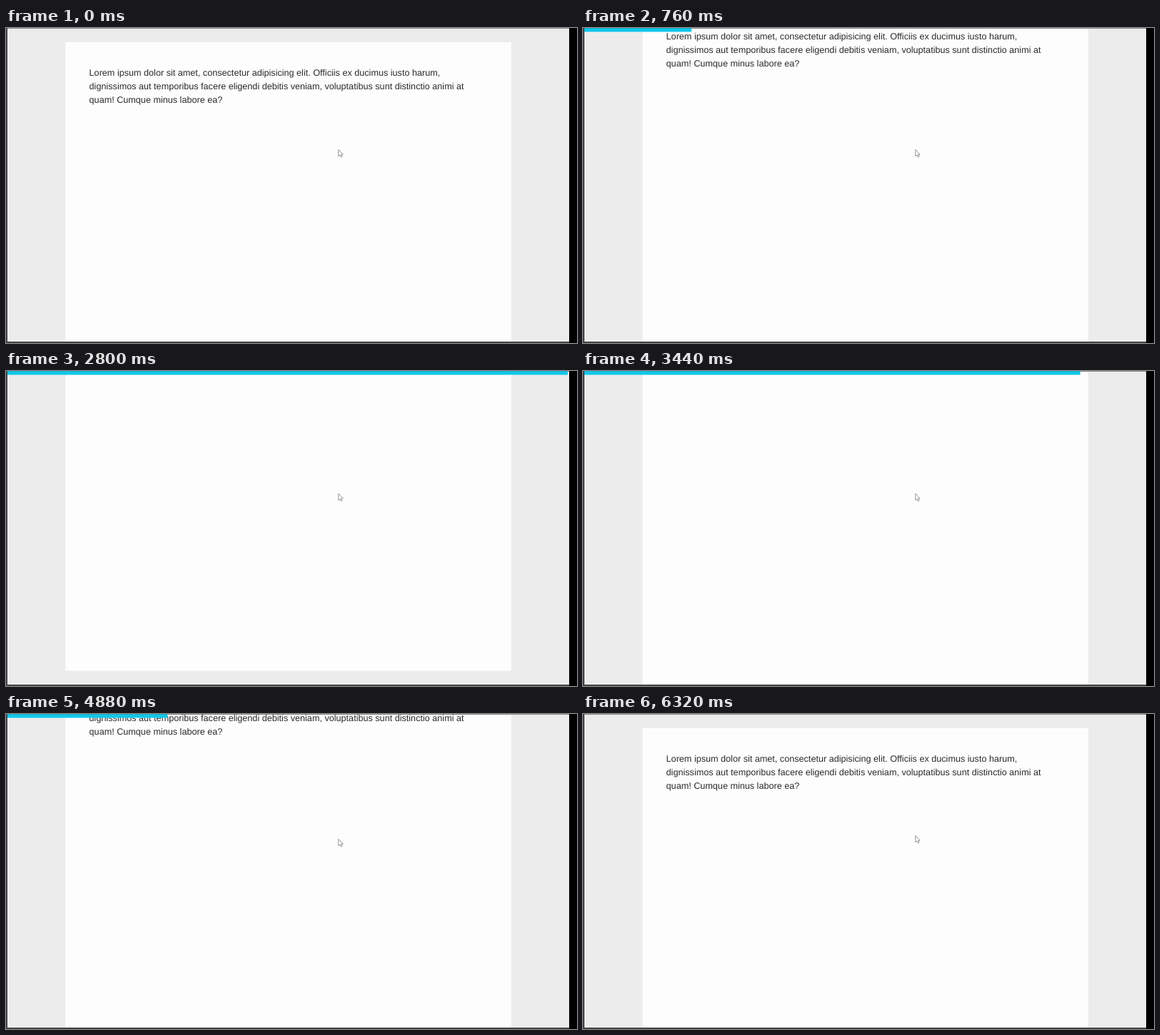
Write an HTML page that moves like this. It is 800 by 442 pixels and loops after 6760 ms.

```html
<!DOCTYPE html>
<html lang="en">
<head>
<meta charset="utf-8">
<title>Scroll progress bar</title>
<style>
  html, body { margin: 0; width: 100%; height: 100%; overflow: hidden; background: #000; }
  svg { display: block; width: 100%; height: 100%; }
  text { font: 12.63px "Liberation Sans", Arial, sans-serif; fill: #2b2b2b; text-rendering: geometricPrecision; }
</style>
</head>
<body>
<svg viewBox="0 0 800 442">
  <rect width="789" height="442" fill="#444"/>
  <svg x="2" width="787" height="440" viewBox="2 0 787 440">
    <rect x="2" width="787" height="440" fill="#ececec"/>
    <g id="page">
      <rect x="83.3" y="20" width="624.7" height="668" fill="#fdfdfd"/>
      <text x="116.6" y="67">Lorem ipsum dolor sit amet, consectetur adipisicing elit. Officiis ex ducimus iusto harum,</text>
      <text x="116.6" y="86">dignissimos aut temporibus facere eligendi debitis veniam, voluptatibus sunt distinctio animi at</text>
      <text x="116.6" y="105">quam! Cumque minus labore ea?</text>
    </g>
    <rect x="2" width="787" height="1" fill="#999"/>
    <rect id="bar" x="2" width="0" height="5.4" fill="#12c8ea"/>
    <rect x="2" width="787" height="1" fill="#444" opacity=".2"/>
  </svg>
  <path id="cursor" d="M465.8 170.6v9.4l2.1-1.9 1.6 3.1 1.5-.8-1.5-2.9h2.7z" fill="#fff" stroke="#777" stroke-width=".8"/>
</svg>
<script>
  const LOOP = 6760, STEP = 40, BAR_WIDTH = 787, MAX_SCROLL = 268;

  // [time in ms, bar width]
  const scrollKeys = [
    [160, 0], [760, 150], [1520, 403], [2000, 572], [2200, 608], [2800, 785], [2840, 787],
    [3120, 787], [3560, 660], [4080, 491], [4240, 424], [4920, 212], [5440, 94], [5600, 0]
  ];
  const page = document.getElementById("page");
  const bar = document.getElementById("bar");
  const cursor = document.getElementById("cursor");

  function interpolate(keys, t) {
    const next = keys.findIndex(([time]) => time > t);
    if (next === 0) return keys[0][1];
    if (next < 0) return keys[keys.length - 1][1];
    const [t0, v0] = keys[next - 1], [t1, v1] = keys[next];
    return v0 + (v1 - v0) * (t - t0) / (t1 - t0);
  }

  function cursorOffset(t) {
    if (t < 2120 || t >= 5520) return 0;
    return t < 4600 ? 1.4 : 5;
  }

  function draw() {
    const t = Math.floor(performance.now() % LOOP / STEP) * STEP;
    const width = interpolate(scrollKeys, t);
    bar.setAttribute("width", width);
    page.setAttribute("transform", `translate(0 ${-MAX_SCROLL * width / BAR_WIDTH})`);
    cursor.setAttribute("transform", `translate(0 ${cursorOffset(t)})`);
    requestAnimationFrame(draw);
  }
  draw();
</script>
</body>
</html>
```
